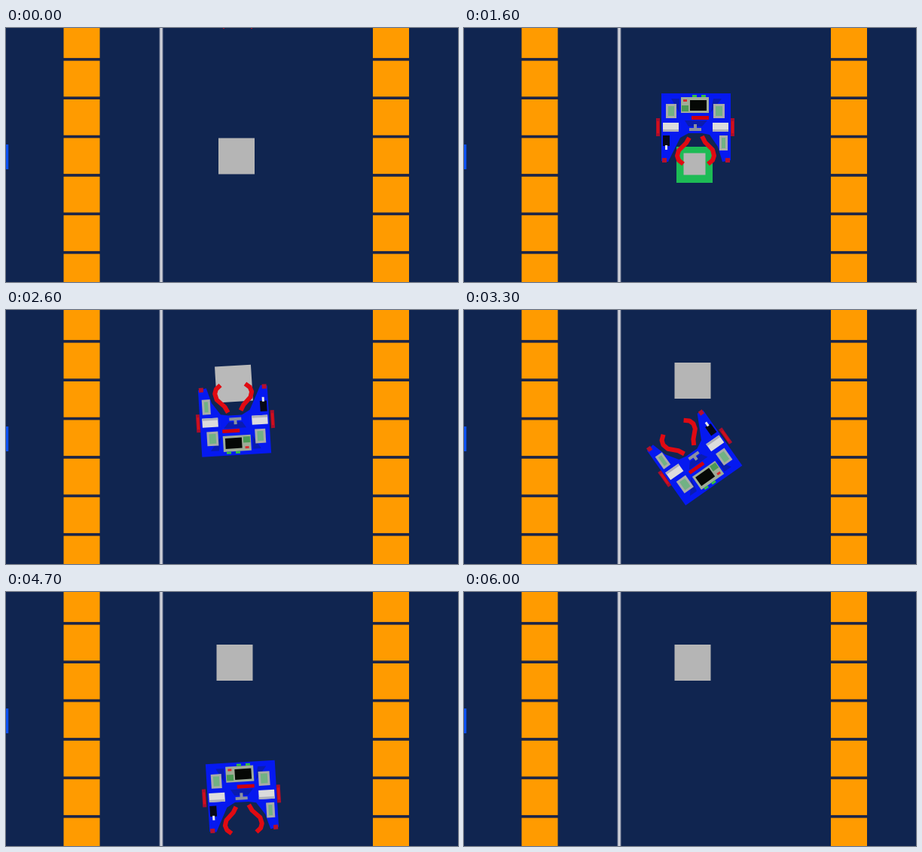
Recreate the animation shown at these times as an HTML page with a canvas. Size 600 by 338 pixels, loop 6100 ms.

```html
<!DOCTYPE html>
<html lang="en">
<head>
<meta charset="utf-8">
<title>Robot moving a box</title>
<style>
html, body { margin: 0; width: 100%; height: 100%; overflow: hidden; background: #102550; }
canvas { display: block; }
</style>
</head>
<body>
<canvas id="stage" width="600" height="338"></canvas>
<script>
const ctx = document.getElementById('stage').getContext('2d');
const LOOP = 6100, STEP = 100;
const GRAB = 1500, FLASH_END = 1700, RELEASE = 2650;
const BOX = 48;

// time, pivot x, pivot y, heading in degrees (0 faces down)
const route = [
  [200, 306, -42, 0], [1500, 306, 140, 0], [1600, 306, 140, 0],
  [2600, 305, 140, -183.5], [2750, 305, 140, -183.5],
  [3140, 302.8, 189, -183.5], [4050, 303.5, 189, -363.5],
  [4200, 305.5, 210, -363.5], [5200, 318.5, 349, -363.5], [5700, 325, 419, -363.5]
];

function poseAt(t) {
  if (t <= route[0][0]) return route[0].slice(1);
  const i = route.findIndex(key => key[0] > t);
  if (i < 0) return route[route.length - 1].slice(1);
  const a = route[i - 1], b = route[i];
  const k = (t - a[0]) / (b[0] - a[0]);
  return [1, 2, 3].map(n => a[n] + (b[n] - a[n]) * k);
}

function rect(color, x, y, w, h) {
  ctx.fillStyle = color;
  ctx.fillRect(x, y, w, h);
}

function square(color, x, y, size) {
  rect(color, x - size / 2, y - size / 2, size, size);
}

function shape(color, ...points) {
  ctx.fillStyle = color;
  ctx.beginPath();
  points.forEach(([x, y]) => ctx.lineTo(x, y));
  ctx.fill();
}

function line(color, width, ...points) {
  ctx.strokeStyle = color;
  ctx.lineWidth = width;
  ctx.lineJoin = 'round';
  ctx.beginPath();
  points.forEach(([x, y]) => ctx.lineTo(x, y));
  ctx.stroke();
}

function chip(x, y, w, h) {
  rect('#a9aba9', x, y, w, h);
  rect('#72b184', x + 3, y + 3, w - 6, h - 6);
}

function drawField() {
  rect('#102550', 0, 0, 600, 338);
  for (const x of [76.5, 487]) {
    rect('#1c2547', x, 0, 48, 338);
    for (let y = -7.8; y < 338; y += 51.4) rect('#ff9b00', x, y, 48, 47.7);
  }
  rect('#747e98', 203.5, 0, 5, 338);
  rect('#d0d1d8', 204.5, 0, 3, 338);
  rect('#0a50f0', 0, 155, 3.2, 33);
}

function drawRobot() {
  shape('#0519f0', [-45, -45], [47, -45], [47, 44], [36, 46], [30, 26], [19, 10],
    [9, 8], [-9, 8], [-20, 14], [-32, 38], [-36, 46], [-45, 45]);
  shape('#0a1cb0', [-32, -38], [-21, -38], [-21, -19]);
  shape('#0a1cb0', [35, -38], [24, -38], [20, -19]);
  shape('#0a1cb0', [-14, -9], [16, -9], [9, -1], [-9, -1]);

  rect('#9fac98', -19, -40, 37, 21);
  rect('#4b9a55', -18, -29, 9, 8);
  rect('#050805', -7, -36, 22, 14);
  rect('#d83030', -16, -37, 5, 3);
  rect('#35c040', -4, -43, 6, 3);
  rect('#35c040', 8, -43, 6, 3);

  chip(-39, -31, 14, 19);
  chip(24, -31, 15, 19);
  chip(32, 11, 11, 20);
  rect('#d0000c', -5, -15, 23, 5);
  for (const x of [-43, 23]) {
    rect('#dcdcdc', x, -6, 21, 12);
    rect('#aeb0ba', x, 3, 21, 3);
  }
  rect('#8c91a0', -8, 1, 16, 4);
  rect('#8c91a0', -2, -4, 4, 6);
  rect('#060818', -43, 11, 9, 14);
  rect('#e6e6ee', -40, 24, 3, 6);

  for (const x of [-52, 47]) {
    rect('#a90d2b', x, -12, 5, 24);
    rect('#d1101c', x + 1, -8, 3, 16);
  }
  rect('#b5102c', -44, 41, 6, 6);
  rect('#b5102c', 40, 41, 6, 6);
  line('#e00a12', 6, [-8, 14], [-12, 21], [-22, 31], [-24, 38], [-22, 44], [-16, 49]);
  line('#e00a12', 6, [9, 12], [13, 20], [23, 30], [25, 38], [23, 44], [17, 49]);
}

function draw(t) {
  const [x, y, heading] = poseAt(t);
  const held = t >= GRAB && t < RELEASE;
  drawField();
  if (t < GRAB) square('#b5b5b5', 306, Math.max(170.5, y + 42), BOX);
  if (t >= RELEASE) square('#b5b5b5', 303.5, 94, BOX);

  ctx.save();
  ctx.translate(x, y);
  ctx.rotate(heading * Math.PI / 180);
  ctx.translate(1, -8);
  if (held) {
    const flash = t < FLASH_END;
    square(flash ? '#1dbb55' : '#b9b9b9', -1, 50, BOX);
    if (flash) square('#b5b5b5', -1, 49, 29);
  }
  drawRobot();
  ctx.restore();
}

function tick() {
  const t = performance.now() % LOOP;
  draw(Math.floor(t / STEP) * STEP);
  requestAnimationFrame(tick);
}
tick();
</script>
</body>
</html>
```
